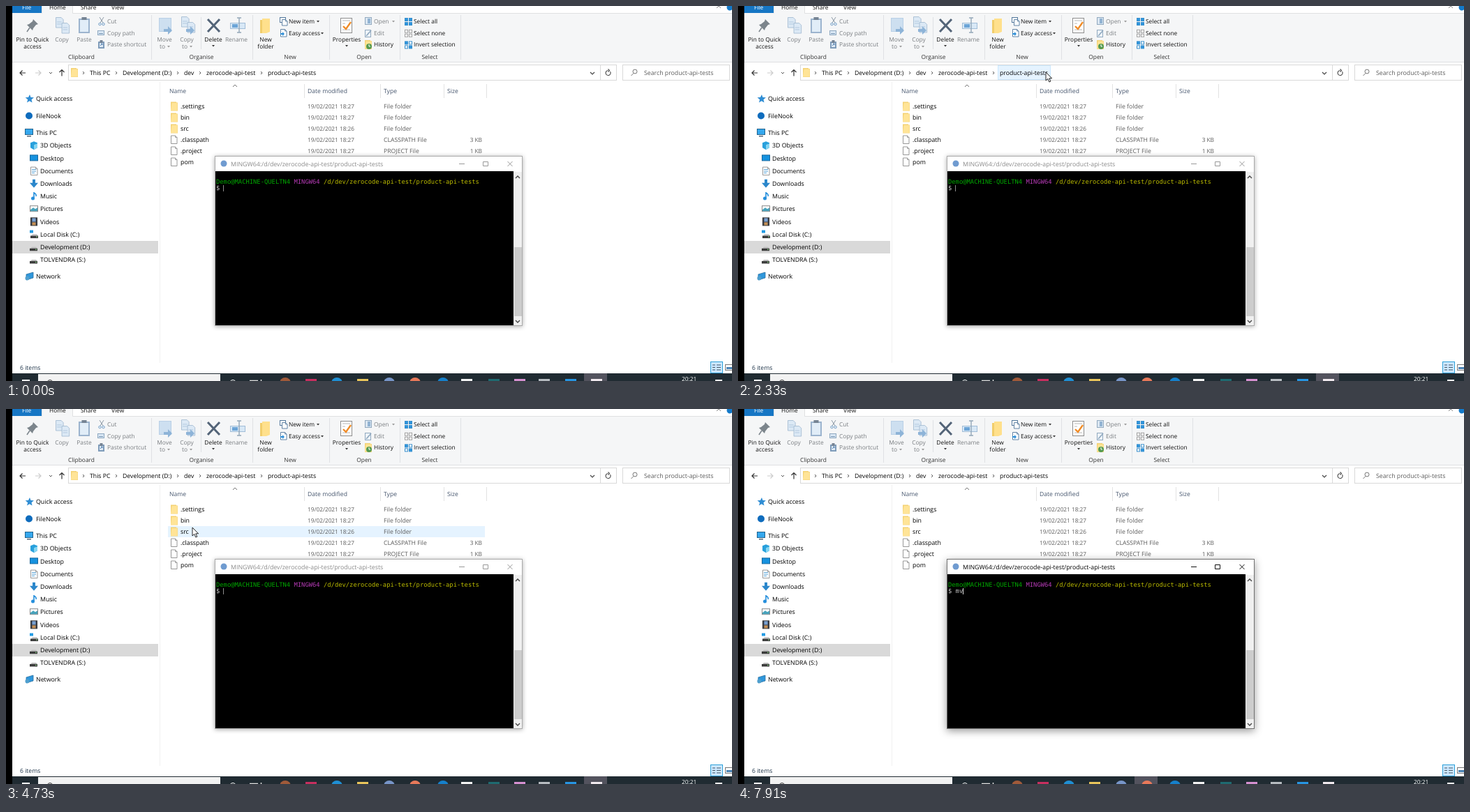
An HTML page that plays this animation: 1040 by 538 pixels, repeating every 8000 ms.

```html
<!DOCTYPE html>
<html lang="en">
<head>
<meta charset="utf-8">
<title>File manager and terminal</title>
<style>
html, body { margin: 0; width: 100%; height: 100%; overflow: hidden; background: #fff; }
svg { display: block; width: 1040px; height: 538px; }
text { font-family: "Open Sans", "Noto Sans", sans-serif; text-rendering: geometricPrecision; white-space: pre; }
.mono text { font-family: "DejaVu Sans Mono", monospace; }
</style>
</head>
<body>
<svg id="stage" viewBox="0 0 1040 538"></svg>
<script>
const LOOP = 8000;
const stage = document.getElementById('stage');
let layer = stage;

function add(tag, attrs, content) {
  const el = document.createElementNS('http://www.w3.org/2000/svg', tag);
  for (const k in attrs) el.setAttribute(k, attrs[k]);
  if (content) el.textContent = content;
  layer.append(el);
  return el;
}
const group = (attrs, draw) => {
  const outer = layer, g = add('g', attrs);
  layer = g;
  draw();
  layer = outer;
  return g;
};
const at = (x, y, draw) => group({ transform: `translate(${x} ${y})` }, draw);
const box = (x, y, width, height, fill, stroke = 'none') => add('rect', { x, y, width, height, fill, stroke });
const frame = (x, y, w, h, fill, stroke) => box(x + .5, y + .5, w - 1, h - 1, fill, stroke);
const dot = (cx, cy, r, fill) => add('circle', { cx, cy, r, fill });
const ring = (cx, cy, r, stroke) => add('circle', { cx, cy, r, fill: 'none', stroke });
const line = (d, stroke, width = 1) => add('path', { d, stroke, 'stroke-width': width, fill: 'none' });
const shape = (d, fill, stroke = 'none', width = 1) => add('path', { d, fill, stroke, 'stroke-width': width });
const label = (x, y, str, size = 8.8, fill = '#000', anchor = 'start') =>
  add('text', { x, y, 'font-size': size, fill, 'text-anchor': anchor }, str);

const GREY = '#7a7e82', INK = '#111';
const ribbon = (x, y, str, fill = INK) => label(x, y, str, 8.4, fill);
const ribbonMid = (x, y, str, fill = INK) => label(x, y, str, 8.4, fill, 'middle');
const caretDown = (x, y, fill = '#333') => shape(`M${x - 2} ${y - 1}h4l-2 2.5z`, fill);
const chevron = (x, y) => line(`M${x - 1} ${y - 2}l2 2-2 2`, '#444', .9);

// Icons, each drawn from its own top left corner
const icon = {
  folder() { shape('M0 0h8v1h2v12h-10z', '#f3d274'); shape('M1.500 1.500h8v11h-9.500z', '#ffe497'); },
  page(w = 9, h = 12, edge = '#8d8d8d') {
    shape(`M.5.500h${w - 3}l2.500 2.500v${h - 3}h${.5 - w}z`, '#fff', edge, .9);
    line(`M${w - 2.500}.500v2.500h2.500`, edge, .8);
  },
  copies(w, h) {
    for (const k of [0, 1]) at(k * w * .45, k * h * .35, () => {
      shape(`M.5.500h${w * .4}l3 3v${h * .5}h${-w * .4 - 3}z`, '#dce9f5', '#9eb6cf', .8);
      line(`M2 ${h * .3}h${w * .35}m${-w * .35} 3h${w * .35}`, '#a9c2da', .8);
    });
  },
  clipboard(w, h, fill, edge) {
    frame(0, 2, w, h - 2, edge, edge); box(2, 4, w - 4, h - 6, fill); box(w * .28, 0, w * .44, 4, '#768494');
  },
  drive() { shape('M1 4l2-2h6l2 2z', '#bbb'); box(0, 4, 11, 3.500, '#3b3b3b'); box(8, 5, 2, 1, '#8ee08a'); },
  screen() { frame(0, 0, 12, 9, '#35a8ee', '#22648f'); box(3, 10, 6, 1.500, '#567'); }
};

function drawRibbon() {
  box(0, 0, 1040, 538, '#fff');
  box(9, 10, 1031, 71, '#f5f6f7');
  box(9, 0, 42, 10, '#1676c4');
  box(52, 0, 43, 11, '#f5f6f7');
  line('M51.500 0V10.500M95.500 0V10.500H1040M9 80.500H1040', '#dfe0e2');
  line('M208.500 13V77M279.500 16V62M353.500 13V77M463.500 13V77M564.500 13V77M651.500 13V77', '#dfe1e4');
  label(23, 5, 'File', 8.4, '#fff');
  ribbon(62, 5, 'Home');
  ribbon(107, 5, 'Share');
  ribbon(151, 5, 'View');
  line('M1018 3l3-3 3 3', '#888');
  dot(1037, 2, 4.500, '#1379c9');

  at(29, 19, () => {
    shape('M10 0l7 7-3 1-4 5-1 3-8-8 3-1 5-4z', '#7c858c');
    line('M5 12L1 18', '#7c858c', 1.500);
  });
  ribbonMid(38, 51, 'Pin to Quick'); ribbonMid(38, 61, 'access');
  at(71, 16, () => icon.copies(19, 23));
  ribbonMid(80, 51, 'Copy', GREY);
  at(104, 16, () => icon.clipboard(16, 23, '#e1edf8', '#9cb4ce'));
  ribbonMid(112, 51, 'Paste', GREY);
  line('M134 16l5 8M140 16l-5 8', '#8d9aa6');
  for (const x of [134.500, 139.500]) ring(x, 26, 1.700, '#6f9cc6');
  frame(131, 35, 10, 7, '#dbe8f5', '#8da7c0'); line('M133 39.500h6', '#7090b0');
  at(132, 49, () => icon.clipboard(9, 12, '#dfeaf5', '#7f9cba'));
  line('M135 57l3-3m-2 0h2v2', '#507fae');
  ['Cut', 'Copy path', 'Paste shortcut'].forEach((s, i) => ribbon(145, 25 + i * 16.700, s, GREY));

  for (const x of [227, 259]) {
    if (x > 240) at(x - 8, 15, () => icon.copies(19, 23));
    else frame(x - 8, 17, 18, 20, '#cddff0', '#b9d0e6');
    shape(`M${x - 1} 33h6v-4l6 6-6 6v-4h-6z`, '#8eb4d8');
    ribbonMid(x, 51, x > 240 ? 'Copy' : 'Move', GREY);
    ribbonMid(x - 3, 61, 'to', GREY);
    caretDown(x + 6, 58, '#999');
  }
  line('M289 19l17 18M306 19l-17 18', '#536478', 3);
  ribbonMid(297, 51, 'Delete'); caretDown(297, 57);
  frame(321, 24, 22, 9, '#d8e8f6', '#a1bdd7'); box(324, 26, 8, 5, '#6da5d7');
  line('M331 17h6M334 17v21m-3 0h6', '#92a6b8', 1.400);
  ribbonMid(330, 51, 'Rename', GREY);

  at(364, 18, () => { shape('M0 2h7v19h-7z', '#f1cd6c'); shape('M3 0h11v19l-5 2h-6z', '#ffe08c'); });
  ribbonMid(372, 51, 'New'); ribbonMid(372, 61, 'folder');
  at(392, 16, () => { frame(0, 0, 9, 8, '#fff', '#52779b'); at(3, 3, () => icon.page(8, 9, '#52779b')); });
  at(393, 33, () => { icon.page(9, 11, '#52779b'); shape('M0 6h3v-2l3 3-3 3v-2h-3z', '#2c8cd5'); });
  ribbon(405, 25, 'New item'); caretDown(447, 22);
  ribbon(405, 42, 'Easy access'); caretDown(453, 39);

  frame(479, 17, 17, 22, '#fff', '#8d8d8d');
  line('M482 21h11m-11 4h4m-4 9h11', '#b8b8b8');
  line('M483 29l4 4 7-10', '#f08b26', 2.400);
  ribbonMid(488, 51, 'Properties'); caretDown(488, 57);
  frame(514, 16, 10, 11, '#dbe7f2', '#91a9bf'); box(518, 18, 4, 7, '#91b3d2');
  frame(514, 34, 9, 11, '#eef4fa', '#91a9bf'); line('M516 43l7-8', '#91a9bf', 1.600);
  at(514, 49, icon.folder); dot(520, 58, 4, '#559a50'); line('M520 55v3h2', '#fff');
  ribbon(527, 25, 'Open', GREY); caretDown(555, 22, '#999');
  ribbon(527, 42, 'Edit', GREY); ribbon(527, 58, 'History');
  for (let row = 0; row < 3; row++) for (let i = 0; i < 4; i++) {
    const on = row === 0 || row === 2 && i % 3 === 0;
    frame(571 + i % 2 * 6, 17 + row * 16.700 + (i >> 1) * 6, 5, 5, on ? '#2d95de' : '#fff', row === 1 ? '#a0a0a0' : '#3990cd');
  }
  ['Select all', 'Select none', 'Invert selection'].forEach((s, i) => ribbon(584, 25 + i * 16.700, s));
  const groups = { Clipboard: 108, Organise: 280, New: 407, Open: 513, Select: 607 };
  for (const name in groups) ribbonMid(groups[name], 76, name, '#333');
}

let crumb;
function drawAddress() {
  line('M28 96h-8m3.500-3.500L20 96l3.500 3.500', '#333', 1.200);
  line('M42 96h8m-3.500-3.500L50 96l-3.500 3.500', '#ccc', 1.200);
  line('M62 95l2 2 2-2', '#555');
  line('M80 100.500v-9m-3.500 3.500l3.500-3.500 3.500 3.500', '#333', 1.200);
  frame(89, 84, 786, 23, '#fff', '#d9d9d9');
  line('M851.500 84V107', '#d9d9d9');
  crumb = frame(372, 85, 76, 21, '#e5f3ff', '#cce8ff');
  at(93, 89, icon.folder);
  const path = [[120, 'This PC'], [167, 'Development (D:)'], [255, 'dev'], [287, 'zerocode-api-test'], [375, 'product-api-tests']];
  for (const [x, s] of path) { label(x, 99, s, 8.700); chevron(x - 9, 96); }
  line('M837 95l3 3 3-3', '#444', 1.200);
  line('M865.500 94a3.500 3.500 0 1 1-3-1.500m0-2l2 2-2 2', '#444', 1.100);
  frame(883, 84, 154, 23, '#fff', '#d9d9d9');
  ring(901, 94, 3, '#777');
  line('M899 96.500l-3.500 3.500', '#777');
  label(914, 99, 'Search product-api-tests', 8.750, '#5c5c5c');
}

function drawSidebar() {
  line('M220.500 109V512', '#f0f0f0');
  box(9, 337, 209, 18, '#d9d9d9');
  const icons = [
    () => shape('M7 0l1.500 4 4.500.300-3.500 3 1 4.200-3.800-2.300-3.700 2.300 1.200-4.200-3.500-3 4.300-.300z', '#2f8dd4'),
    () => dot(6, 6, 5, '#0f6cbd'),
    icon.screen,
    () => { shape('M1 2l5-2 5 2v7l-5 3-5-3z', '#28a0dc'); shape('M6 5l5-2v6l-5 3z', '#85d6f2'); },
    () => frame(0, 1, 12, 9, '#1592df', '#16679e'),
    () => { at(1, 0, () => icon.page(10, 12)); line('M3 4h6m-6 2.500h6m-6 2.500h4', '#4598d2', .9); },
    () => shape('M4 0h4v5h4l-6 7-6-7h4z', '#2b87cb'),
    () => { line('M6 0v9M6 1q4 2 3 5', '#268fdc', 1.600); dot(4.500, 9, 2.500, '#268fdc'); },
    () => { frame(0, 1, 12, 9, '#fff', '#888'); shape('M1 7l4-3 3 2 3-2v5h-10z', '#47a3bc'); },
    () => { frame(1, 0, 10, 12, '#3c4350', '#303030'); box(3.500, 1, 5, 5, '#779fd0'); box(3.500, 7, 5, 4, '#c69052'); },
    () => { box(0, 0, 5, 4, '#239be3'); at(1, 4, icon.drive); },
    () => at(0, 4, icon.drive),
    () => at(0, 4, icon.drive),
    () => { shape('M2 3l10-3v8l-10 3z', '#2f97dc', '#2a6f9f', .8); dot(3.500, 8.500, 3, '#4f9fce'); }
  ];
  const names = ['Quick access', 'FileNook', 'This PC', '3D Objects', 'Desktop', 'Documents', 'Downloads',
    'Music', 'Pictures', 'Videos', 'Local Disk (C:)', 'Development (D:)', 'TOLVENDRA (S:)', 'Network'];
  names.forEach((name, i) => {
    const top = i < 3 || i === 13;
    const y = i < 2 ? 133 + i * 24.500 : i === 13 ? 388 : 182 + (i - 2) * 18.200;
    at(top ? 27 : 34, y - 6, icons[i]);
    label(top ? 43 : 49, y + 3.200, name, 8.800);
  });
}

let rowHover;
function drawFiles() {
  rowHover = box(232, 136, 454, 16, '#e5f3ff');
  line('M427.500 112V132M536.500 112V132M627.500 112V132M688.500 112V132', '#e2e2e2');
  line('M325 116l3-3 3 3', '#777');
  const heads = { Name: 234, 'Date modified': 432, Type: 541, Size: 632 };
  for (const h in heads) label(heads[h], 125, h, 8.600, '#44546c');
  const files = [['.settings', 'File folder'], ['bin', 'File folder'], ['src', 'File folder'],
    ['.classpath', 'CLASSPATH File', '3 KB'], ['.project', 'PROJECT File', '1 KB'], ['pom', 'XML Document', '2 KB']];
  files.forEach(([name, type, size], i) => {
    const y = 147 + i * 16;
    at(236, y - 9.500, i < 3 ? icon.folder : () => icon.page());
    label(250, y, name, 8.800);
    label(432, y, `19/02/2021 18:2${i === 2 ? 6 : 7}`, 8.250, '#5c5c5c');
    label(541, y, type, 8.700, '#5c5c5c');
    if (size) label(682, y, size, 8.300, '#5c5c5c', 'end');
  });
  label(20, 522, '6 items', 8.600, '#20354a');
  frame(1009, 510, 18, 17, '#cce8ff', '#2da0d8');
  for (const y of [515, 518.500, 522]) line(`M1012 ${y}h4m2 0h6`, '#456', 1.200);
  frame(1030, 514, 12, 9, '#fff', '#777');
  box(1032, 518, 8, 3, '#4b83b4');
}

let activeTask;
function drawTaskbar() {
  box(9, 527, 1031, 11, '#202b32');
  box(46, 528, 261, 10, '#f2f2f2');
  activeTask = box(828, 527, 33, 11, '#53535e');
  box(23, 536, 11, 2, '#fff');
  ring(63, 540, 3.500, '#333');
  ring(325, 541, 4.500, '#fff');
  line('M349 537.500h12M365.500 536v2', '#ddd', 1.500);
  const disc = { 400: '#a05a3a', 474: '#1f8fd4', 549: '#7795c8', 586: '#e8795a', 626: '#1680cb' };
  for (const x in disc) dot(+x, 541, 8, disc[x]);
  const square = { 437: '#c62f5f', 511: '#e8c45b', 660: '#f3f3f3', 699: '#1f6a70', 736: '#d590d0', 771: '#b6bbc0', 809: '#2795e2', 846: '#f0e9ee' };
  for (const x in square) box(x - 8, 535, 16, 3, square[x]);
  label(968, 538, '20:21', 8.400, '#fff');
  box(1016, 536, 10, 2, '#eee');
  box(0, 0, 9, 538, '#000');
}

let edge, title, controls, typed, caret;
function drawTerminal() {
  edge = frame(299, 215, 441, 244, '#fff', '#aaa');
  dot(312, 226, 4.500, '#6f9bd0');
  title = label(322, 230, 'MINGW64:/d/dev/zerocode-api-test/product-api-tests', 8.820);
  controls = line('M649 226.500h8M683.500 223.500h7v6h-7zM718.500 223l7 7m0-7l-7 7', '#999');
  box(300, 237, 427, 221, '#000');
  box(727, 238, 12, 220, '#f0f0f0');
  box(728, 346, 11, 99, '#cdcdcd');
  line('M730 247l3-3 3 3M730 451l3 3 3-3', '#444', 1.400);
  group({ class: 'mono' }, () => {
    const advance = 5.310, size = 8.820;
    const put = (col, y, s, fill) => label(301 + col * advance, y, s, size, fill);
    put(0, 255, 'Demo@MACHINE-QUELTN4', '#00a800');
    put(21, 255, 'MINGW64', '#b63bb6');
    put(29, 255, '/d/dev/zerocode-api-test/product-api-tests', '#b9b900');
    put(0, 264, '$', '#c4c4c4');
    typed = put(2, 264, '', '#c4c4c4');
  });
  caret = box(311, 257, 1, 9, '#bfbfbf');
}

drawRibbon();
drawAddress();
drawSidebar();
drawFiles();
drawTaskbar();
drawTerminal();
const arrow = shape('M0 0V12L2.800 9.400 4.800 14 6.800 13.200 4.800 8.800H8.600Z', '#fff', '#111', .9);
const beam = line('M-3-6H-1Q0-6 0-5V5Q0 6-1 6H-3M3-6H1Q0-6 0-5M0 5Q0 6 1 6H3', '#e8e8e8');

// Pointer moves: start, end, step count, waypoints of [step, x, y]
const moves = [
  [310, 1070, 11, [[0, 972, 517], [3, 770, 300], [6, 600, 150], [8, 490, 85], [9, 472, 80], [10, 462, 100]]],
  [1160, 1920, 10, [[0, 456, 101], [3, 410, 97], [6, 381, 95], [9, 408, 95]]],
  [2000, 2330, 5, [[0, 414, 95], [4, 441, 95]]],
  [3080, 3550, 7, [[0, 420, 108], [3, 325, 144], [5, 221, 160], [6, 240, 158]]],
  [3820, 4350, 8, [[0, 246, 155], [2, 262, 146], [4, 269, 147], [7, 267, 164]]],
  [4730, 5500, 11, [[0, 267, 170], [4, 340, 200], [10, 528, 255]]],
  [5580, 6350, 11, [[0, 535, 255], [10, 648, 256]]],
  [6440, 7050, 9, [[0, 648, 258], [8, 639, 271]]]
];
const FOCUS = 6900, KEY_M = 7680, KEY_V = 7910;

function pointerAt(t) {
  const move = moves.filter(m => t >= m[0]).pop();
  if (!move) return null;
  const [start, end, steps, path] = move;
  const k = Math.min(steps - 1, Math.floor((t - start + 8) * (steps - 1) / (end - start)));
  const next = path.findIndex(p => p[0] >= k);
  const b = path[next], a = path[Math.max(0, next - 1)];
  const f = b[0] === a[0] ? 0 : (k - a[0]) / (b[0] - a[0]);
  return [a[1] + (b[1] - a[1]) * f, a[2] + (b[2] - a[2]) * f].map(Math.round);
}
const show = (el, on) => el.setAttribute('visibility', on ? 'visible' : 'hidden');
const clamp = v => Math.max(0, Math.min(1, v));

function render(t) {
  const p = t < KEY_M ? pointerAt(t) : null;
  const [x, y] = p || [0, 0];
  const inText = x > 300 && x < 727 && y > 238 && y < 458;
  show(arrow, p && !inText);
  show(beam, p && inText);
  for (const el of [arrow, beam]) el.setAttribute('transform', `translate(${x} ${y})`);

  const overWindow = x >= 299 && x < 740 && y >= 215 && y < 459;
  const row = Math.floor((y - 136) / 16);
  show(rowHover, x >= 232 && x < 686 && row >= 0 && row < 6 && !overWindow);
  rowHover.setAttribute('y', 136 + row * 16);
  crumb.setAttribute('opacity', clamp((t - 1200) / 200) * clamp((3280 - t) / 200));

  const focused = t >= FOCUS;
  title.setAttribute('fill', focused ? '#000' : '#8a8a8a');
  controls.setAttribute('stroke', focused ? '#111' : '#999');
  edge.setAttribute('stroke', focused ? '#707070' : '#aaa');
  edge.style.filter = focused ? 'drop-shadow(0 3px 6px #0006)' : 'drop-shadow(0 1px 3px #0005)';
  activeTask.setAttribute('x', focused ? 568 : 828);

  const text = t >= KEY_V ? 'mv' : t >= KEY_M ? 'm' : '';
  if (typed.textContent !== text) typed.textContent = text;
  caret.setAttribute('x', [311, 317, 322][text.length]);
  caret.setAttribute('fill', focused ? '#e0e0e0' : '#8c8c8c');
  show(caret, t < 7450 || t >= KEY_M);
}

const began = performance.now();
function tick() {
  render((performance.now() - began) % LOOP);
  requestAnimationFrame(tick);
}
tick();
</script>
</body>
</html>
```
